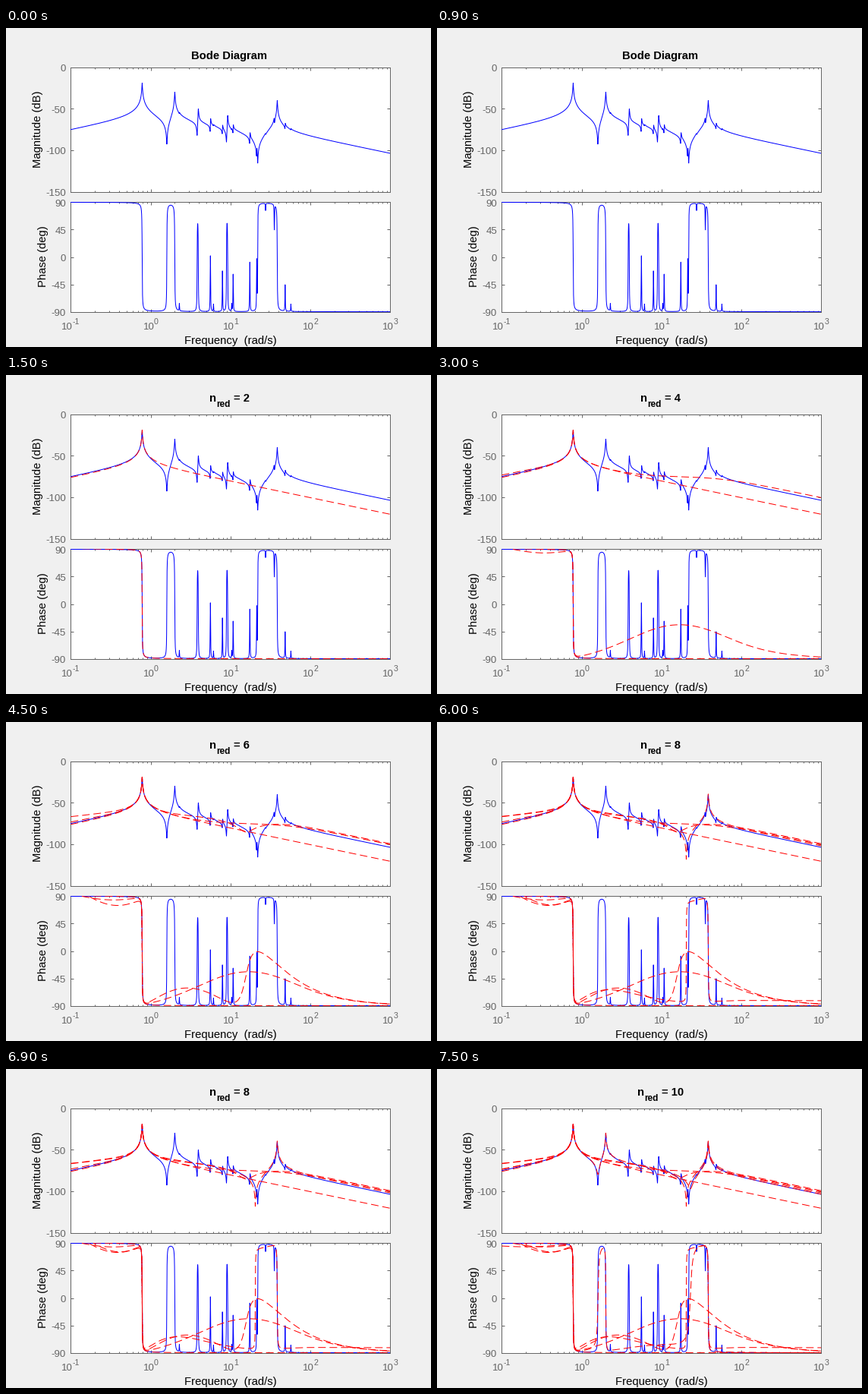
A matplotlib script for the animation above (8000 ms loop, 560 by 420 pixels).

```python
import numpy as np
import matplotlib.pyplot as plt
from matplotlib.animation import FuncAnimation

W, H, DPI = 560, 420, 100
BLUE, RED, GREY = "#0000ff", "#ff0000", "#666666"
PX = 72 / DPI
ZETA = 0.0055

plt.rcParams["font.family"] = "Liberation Sans"
plt.rcParams["axes.unicode_minus"] = False


# ---- full model: a sum of lightly damped modes ---------------------------
W1, G1 = 0.782, 9.4e-4
# frequency -> zero that the mode's gain must produce
STRONG = {2.003: 1.592, 38.4: 21.85}
# frequency -> height of the phase spike in degrees
WEAK = {3.945: 56, 5.62: 3, 7.94: -22, 9.2: 57, 10.8: -27, 17.5: -7,
        21.35: 12, 35.2: -46, 48.3: -46}
WEAK.update(dict.fromkeys((2.284, 6.11, 10.33, 27.4, 56.9), -78))


def mode(w, wn):
    return 1j * w / (wn**2 - w**2 + 2j * ZETA * wn * w)


def total(w, gains, skip=None):
    return sum(g * mode(w, wn) for wn, g in gains.items() if wn != skip)


def solve_gains():
    gains = {W1: G1, 2.003: 7e-4, 38.4: 4.1e-3}
    for _ in range(40):
        for wn, zero in STRONG.items():
            rest = total(zero, gains, wn).imag
            gains[wn] = -rest / mode(zero, wn).imag
        for wn, deg in WEAK.items():
            rest = abs(total(wn, gains, wn).imag)
            peak = 2 * rest / np.tan(np.radians(90 - deg) / 2)
            gains[wn] = peak * 2 * ZETA * wn
    return gains


gains = solve_gains()
w = np.sort(np.r_[np.logspace(-1, 3, 5000), list(gains)])
s = 1j * w


# ---- reduced models: few modes plus broad real poles ---------------------
def lump(k, zero, low, high):
    return k * (s - zero) / (s + low) * high / (s + high)


def quad(wn, zeta):
    return 1 + 2 * zeta * s / wn + (s / wn)**2


def bode(resp):
    return 20 * np.log10(np.abs(resp)), np.degrees(np.angle(resp))


first = G1 * mode(w, W1) * (1 - 0.0025 / s)
drift = 1.5e-4 * np.clip(np.log10(w / 20.4), 0, 0.2) * np.minimum(1, 38 / w)

red4 = first + lump(1.55e-4, 0.06, 0.28, 55)
red6 = ((first + lump(3.9e-4, 0.15, 0.2, 7))
        * quad(15.5, 0.17) / quad(26.5, 1))
red8 = ((first + lump(4.6e-4, 0.17, 0.25, 2.8))
        * quad(20.4, 0.004) / quad(38.4, 0.007) + drift)
red10 = (total(w, {W1: G1, 2.003: 7e-4, 38.4: 4.2e-3})
         + lump(8e-5, 0, 0.2, 10))

full = bode(total(w, gains))
reduced = [bode(r) for r in (first, red4, red6, red8, red10)]

# ---- stage ---------------------------------------------------------------
fig = plt.figure(figsize=(W / DPI, H / DPI), dpi=DPI, facecolor="#f0f0f0")
LEFT, RIGHT = 85.4, 506.4


def text(x, y, label, size, **kw):
    return fig.text(x / W, 1 - y / H, label, fontsize=size * PX,
                    va="baseline", **kw)


def panel(top, bottom, low, high, ticks):
    ax = fig.add_axes([LEFT / W, 1 - bottom / H, (RIGHT - LEFT) / W,
                       (bottom - top) / H])
    ax.set_xscale("log")
    ax.set_xlim(0.1, 1000)
    ax.set_ylim(low, high)
    ax.set_yticks(ticks)
    for which, length in (("major", 4), ("minor", 2)):
        ax.tick_params(which=which, direction="in", top=True, right=True,
                       length=length * PX, width=PX, color=GREY,
                       labelbottom=False, labelleft=False)
    for spine in ax.spines.values():
        spine.set(color=GREY, linewidth=PX)
    for v in ticks:
        y = bottom - (v - low) / (high - low) * (bottom - top)
        text(79, y + 5.5, str(v), 13.3, ha="right", color=GREY)
    return ax


axes = (panel(51.6, 215.6, -150, 0, range(-150, 1, 50)),
        panel(228.6, 373.6, -90, 91, range(-90, 91, 45)))

for k in range(-1, 4):
    x = LEFT + 105.25 * (k + 1) - (12 if k < 0 else 10)
    text(x, 397, "10", 13.3, color=GREY)
    text(x + 14.4, 390, str(k), 10.6, color=GREY)

upright = dict(rotation=90, rotation_mode="anchor", ha="center")
text(46, 133.5, "Magnitude (dB)", 14.8, **upright)
text(53, 300.5, "Phase (deg)", 14.8, **upright)
text(295.5, 416, "Frequency  (rad/s)", 14.9, ha="center")

for ax, y in zip(axes, full):
    ax.plot(w, y, color=BLUE, lw=PX, zorder=3)

dashed = [[ax.plot(w, y, color=RED, lw=PX, zorder=4, dashes=(10, 5))[0]
           for ax, y in zip(axes, pair)] for pair in reduced]

heading = text(294.5, 41, "Bode Diagram", 14.8, weight="bold", ha="center")
name = text(268, 35, "n", 14.7, weight="bold")
sub = text(277.5, 42, "red", 11.8, weight="bold")
order = text(299.8, 35, "", 14.7, weight="bold")


def update(i):
    stage = i // 3
    for k, pair in enumerate(dashed):
        for line in pair:
            line.set_visible(k < stage)
    heading.set_visible(stage == 0)
    label = f"= {2 * stage}"
    shift = 4 * (len(label) - 3)
    for item, x in ((name, 268), (sub, 277.5), (order, 299.8)):
        item.set_visible(stage > 0)
        item.set_x((x - shift) / W)
    order.set_text(label)
    return []


anim = FuncAnimation(fig, update, frames=16, interval=500, repeat=True,
                     init_func=lambda: update(0), blit=False)
plt.show()
```
